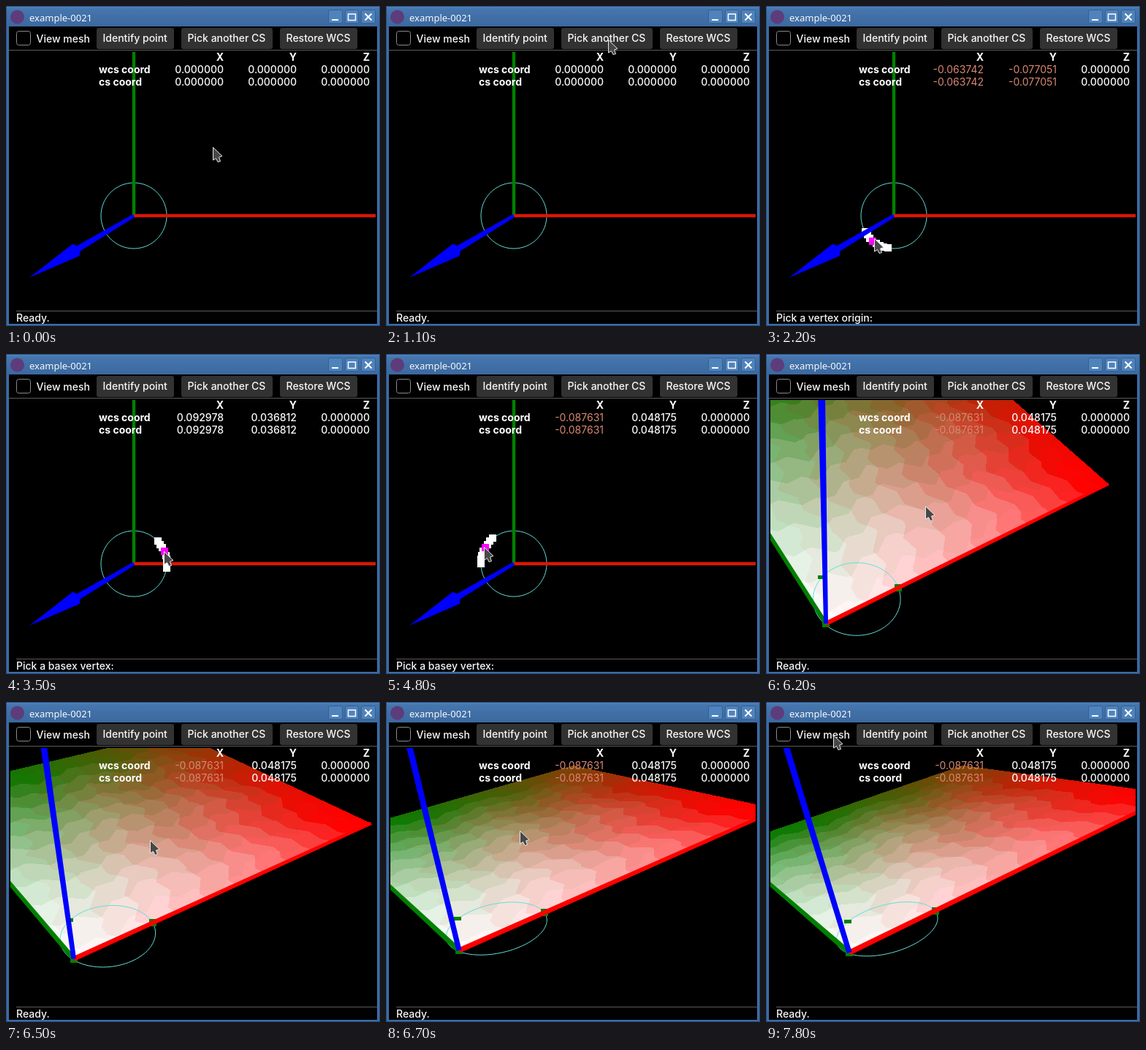
Recreate the animation shown at these times as an HTML page with a canvas. Size 512 by 438 pixels, loop 8000 ms.

```html
<!DOCTYPE html>
<html lang="en">
<head>
<meta charset="utf-8">
<title>example-0021</title>
<style>
  html, body { margin: 0; width: 100%; height: 100%; overflow: hidden; background: #000; }
  canvas, svg { position: absolute; left: 0; top: 0; width: 512px; height: 438px; }
  text { font: 500 14px Inter, "Liberation Sans", sans-serif; fill: #f8f8f8; white-space: pre; }
  .title { font: 13px "Noto Sans", "Open Sans", sans-serif; }
  .b { font-weight: 700; fill: #fff; }
  .num { text-anchor: end; }
  .neg { fill: #d98873; font-weight: 400; }
</style>
</head>
<body>
<canvas id="scene" width="512" height="438"></canvas>
<svg viewBox="0 0 512 438">
  <defs>
    <linearGradient id="bar" x2="0" y2="1">
      <stop offset="0" stop-color="#5586bd"/>
      <stop offset=".15" stop-color="#4576ad"/>
      <stop offset="1" stop-color="#3b689f"/>
    </linearGradient>
  </defs>
  <path d="M0 0H512V438H0ZM4 28V435H508V28Z" fill="#3d6ba3" fill-rule="evenodd"/>
  <rect width="512" height="28" fill="url(#bar)"/>
  <rect x=".5" y=".5" width="511" height="437" fill="none" stroke="#28507f"/>
  <circle cx="15.5" cy="15" r="9.5" fill="#5d3c7c"/>
  <text class="title" x="32" y="21">example-0021</text>
  <g fill="#4f83bd" stroke="#35608f">
    <rect x="441.500" y="5.500" width="19" height="18" rx="2"/>
    <rect x="464.500" y="5.500" width="18" height="18" rx="2"/>
    <rect x="486.500" y="5.500" width="19" height="18" rx="2"/>
  </g>
  <g fill="none" stroke="#fff" stroke-width="2">
    <path d="M446 19H455M491.500 10.500L500.500 19.500M500.500 10.500L491.500 19.500"/>
    <path d="M468.500 11H478.500V19.500H468.500Z" stroke-width="1.500"/>
  </g>
  <rect x="14.500" y="34.500" width="19" height="19" rx="3" fill="#000" stroke="#8a8a8a"/>
  <text x="41.500" y="50">View mesh</text>
  <g fill="#323232">
    <rect x="124" y="30" width="106" height="29" rx="3"/>
    <rect x="240" y="30" width="125" height="29" rx="3"/>
    <rect x="375" y="30" width="106" height="29" rx="3"/>
  </g>
  <text x="132.500" y="49">Identify point</text>
  <text x="248.500" y="49">Pick another CS</text>
  <text x="383.500" y="49">Restore WCS</text>
  <path d="M4 60.500H508M14 417.500H508" stroke="#5a5a5a"/>
  <g id="table">
    <text class="b num" x="298" y="75">X</text>
    <text class="b num" x="398" y="75">Y</text>
    <text class="b num" x="498" y="75">Z</text>
    <text class="b" x="127" y="92">wcs coord</text>
    <text class="b" x="127" y="109">cs coord</text>
  </g>
  <text id="status" x="14" y="432">Ready.</text>
  <path id="cursor" d="M.5 .5V18L4.500 15.500L7 20.500L10.500 19.500L8.500 14L13 12.500Z"
        fill="#484848" stroke="#e8e8e8" stroke-linejoin="round"/>
</svg>
<script>
const LOOP = 8000, TICKS = [0, 100, 200, 400, 500, 700, 800];
const VIEW = {x: 6, y: 63, w: 500, h: 352};
const LENS = {x: 256, y: 239, f: 725};
const RING = {x: 175, y: 287, r: 45, n: 50};
const PICK = 1400, SHOWN = 5000, TURN = 5800;
const HALF = .005;   // half the thickness of an axis

const STATUS = [
  [0, 'Ready.'], [PICK, 'Pick a vertex origin:'], [2400, 'Pick a basex vertex:'],
  [3700, 'Pick a basey vertex:'], [SHOWN, 'Ready.']
];

// Pointer moves: arrival, duration, x, y
const MOVES = [
  [0, 0, 283, 193], [1100, 900, 304, 46], [2200, 900, 148, 318], [3500, 900, 216, 270],
  [4600, 800, 134, 264], [5700, 500, 142, 270], [6200, 400, 218, 208],
  [6800, 600, 176, 170], [7800, 700, 92, 45]
];

// Camera keys: tilt, lean and yaw in degrees, then origin x, y and depth
const WORLD = [0, 0, 0, 175, 287, 1.66];
const TURNS = [
  [TURN, 0, 0, 35.5, 147, 321, 1.66],
  [6200, 42, 14.6, 33, 82, 369, 1.21],
  [6700, 65, -7.2, 40.2, 100, 340, 1.014],
  [6800, 66, -11.2, 41.8, 114, 343, 0.996]
];

const $ = id => document.getElementById(id);
const ctx = $('scene').getContext('2d');
const image = ctx.createImageData(VIEW.w, VIEW.h);
const clamp = v => Math.min(1, Math.max(0, v));
const dot = (a, b) => a[0] * b[0] + a[1] * b[1] + a[2] * b[2];
const mix = (a, b, k) => a.map((v, i) => v + (b[i] - v) * k);

function pointerAt(t) {
  let at = MOVES[0].slice(2);
  for (const [end, span, ...to] of MOVES) {
    at = mix(at, to, span ? clamp((t - end + span) / span) : 1);
  }
  return at;
}

function poseAt(t) {
  if (t < SHOWN) return WORLD;
  let pose = TURNS[0].slice(1), from = TURN;
  for (const [end, ...to] of TURNS.slice(1)) {
    pose = mix(pose, to, clamp((t - from) / (end - from)));
    from = end;
  }
  return pose;
}

// Axes x, y, z and origin o in camera space: right, up, away
function frameOf([tilt, lean, yaw, ox, oy, depth]) {
  const [a, b, c] = [tilt, lean, yaw].map(v => v * Math.PI / 180);
  const sa = Math.sin(a), ca = Math.cos(a), sb = Math.sin(b), cb = Math.cos(b);
  const axis = turn => {
    const x = Math.cos(c + turn), y = Math.sin(c + turn);
    const along = x * sb + y * cb, across = x * cb - y * sb;
    return [across * cb + along * ca * sb, along * ca * cb - across * sb, along * sa];
  };
  return {
    x: axis(0), y: axis(Math.PI / 2), z: [sa * sb, sa * cb, -ca],
    o: [(ox - LENS.x) / LENS.f * depth, (LENS.y - oy) / LENS.f * depth, depth]
  };
}

// Screen position and scale of a point in the frame
function project(fr, u, v, w = 0) {
  const [x, y, d] = fr.o.map((o, i) => o + u * fr.x[i] + v * fr.y[i] + w * fr.z[i]);
  const s = LENS.f / d;
  return [LENS.x + x * s, LENS.y - y * s, s];
}

const statusAt = t => STATUS.filter(s => s[0] <= t).pop()[1];

const steps = [];
for (let s = 0; s < LOOP; s += 1000) for (const k of TICKS) steps.push(s + k);

const vertices = Array.from({length: RING.n}, (_, i) => {
  const a = i * 2 * Math.PI / RING.n;
  const c = Math.cos(a), s = Math.sin(a);
  return {x: RING.x + RING.r * c, y: RING.y + RING.r * s, c, s};
});

// Ring vertices near the pointer, and the closest of them
function pickAt(t) {
  const [px, py] = pointerAt(t);
  const near = vertices.filter(v => Math.abs(v.x - px - 4) < 19 && Math.abs(v.y - py - 5) < 19);
  const dist = v => Math.hypot(v.x - px, v.y - py);
  const best = near.reduce((a, b) => a && dist(a) < dist(b) ? a : b, null);
  return {near, best};
}

// The last vertex that was touched gives the table values
function lastPick(t) {
  for (const s of steps.filter(s => s <= t && s >= PICK && s <= SHOWN).reverse()) {
    const {best} = pickAt(s);
    if (best) return [best.c / 10, -best.s / 10, 0];
  }
  return [0, 0, 0];
}

const cells = [92, 109].map(y => [298, 398, 498].map(x => {
  const el = document.createElementNS('http://www.w3.org/2000/svg', 'text');
  el.setAttribute('x', x);
  el.setAttribute('y', y);
  $('table').append(el);
  return el;
}));

// Flat patches with jagged borders
const zigzag = v => Math.asin(Math.sin(v)) * 2 / Math.PI;
const band = v => Math.round(clamp(v) * 12) / 12;
const fade = v => clamp(v * 1.08) ** 1.35;

// White origin, red x, green y, brown far corner
function shade(u, v) {
  const p = fade(band(u + .03 * zigzag(17 * v + 6 * u) + .012 * zigzag(61 * v)));
  const q = fade(band(v + .03 * zigzag(19 * u - 5 * v) + .012 * zigzag(67 * u)));
  const white = (1 - p) * (1 - q), red = p * (1 - q), green = (1 - p) * q, far = p * q;
  return [
    255 * (white + red) + 125 * far,
    255 * white + 128 * green + 66 * far,
    255 * white + 8 * far
  ];
}

// Cast a ray through each pixel onto the unit square of the xy plane
function drawMesh(fr) {
  const px = image.data, height = dot(fr.o, fr.z);
  let i = 0;
  for (let y = 0; y < VIEW.h; y++) {
    for (let x = 0; x < VIEW.w; x++, i += 4) {
      const ray = [(x + VIEW.x + .5 - LENS.x) / LENS.f, (LENS.y - y - VIEW.y - .5) / LENS.f, 1];
      const k = height / dot(ray, fr.z);
      const hit = ray.map((r, j) => r * k - fr.o[j]);
      const u = dot(hit, fr.x), v = dot(hit, fr.y);
      const inside = k > 0 && u >= 0 && u <= 1 && v >= 0 && v <= 1;
      px[i + 3] = inside ? 255 : 0;
      if (inside) [px[i], px[i + 1], px[i + 2]] = shade(u, v);
    }
  }
  ctx.putImageData(image, VIEW.x, VIEW.y);
}

function box([x, y], color, h = 10) {
  ctx.fillStyle = color;
  ctx.fillRect(Math.round(x - 5), Math.round(y - h / 2), 10, h);
}

function drawRing(fr, u, v) {
  const r = .103;
  ctx.strokeStyle = '#62dfdc';
  ctx.lineWidth = 1;
  ctx.beginPath();
  for (let a = 0; a < 2 * Math.PI; a += Math.PI / 50) {
    const [x, y] = project(fr, u + r * Math.cos(a), v + r * Math.sin(a));
    ctx.lineTo(x, y);
  }
  ctx.closePath();
  ctx.stroke();
}

// A bar along one axis; its profile lists distance and relative thickness
function bar(fr, dir, color, profile = [[0, 1], [1, 1]]) {
  const pts = profile.map(([d, w]) => [...project(fr, ...dir.map(v => v * d)), w * HALF]);
  const [a, b] = [pts[0], pts[pts.length - 1]];
  const len = Math.hypot(b[0] - a[0], b[1] - a[1]) || 1;
  const nx = (a[1] - b[1]) / len, ny = (b[0] - a[0]) / len;
  const side = k => ([x, y, s, w]) => ctx.lineTo(x + nx * s * w * k, y + ny * s * w * k);
  ctx.fillStyle = color;
  ctx.beginPath();
  pts.forEach(side(1));
  pts.reverse().forEach(side(-1));
  ctx.fill();
}

const zBar = fr => bar(fr, [0, 0, 1], '#0000ff', [[0, 1], [.8, 1], [.82, 2.2], [1.06, 0]]);

function drawScene(t) {
  const fr = frameOf(poseAt(t)), solid = t >= SHOWN;
  ctx.clearRect(0, 0, 512, 438);
  if (solid) drawMesh(fr);
  ctx.save();
  ctx.beginPath();
  ctx.rect(VIEW.x, VIEW.y, VIEW.w, VIEW.h);
  ctx.clip();
  drawRing(fr, solid ? .097 : 0, solid ? .026 : 0);
  if (solid) {
    box(project(fr, 0, 0), '#008000');
    box(project(fr, .197, 0), '#008000');
    box(project(fr, .052, .12), '#008000', 5);
  }
  bar(fr, [0, 1, 0], '#008000');
  bar(fr, [1, 0, 0], solid ? '#ff0000' : '#d91607');
  const {near, best} = t >= PICK && t < TURN ? pickAt(Math.min(t, SHOWN)) : {near: []};
  near.forEach(v => box([v.x, v.y], '#fff'));
  zBar(fr);
  if (best) box([best.x, best.y], '#ff00ff');
  ctx.restore();
}

function render(t) {
  drawScene(t);
  $('status').textContent = statusAt(t);
  const [px, py] = pointerAt(t).map(Math.round);
  $('cursor').setAttribute('transform', `translate(${px} ${py})`);
  const values = lastPick(t);
  for (const row of cells) row.forEach((el, i) => {
    el.textContent = values[i].toFixed(6);
    el.setAttribute('class', values[i] < 0 ? 'num neg' : 'num');
  });
}

const start = performance.now();
let shown = 0;
function tick(now) {
  const t = Math.max(0, now - start) % LOOP;
  const step = steps.filter(s => s <= t).pop();
  if (step !== shown) render(shown = step);
  requestAnimationFrame(tick);
}
render(shown);
requestAnimationFrame(tick);
</script>
</body>
</html>
```
